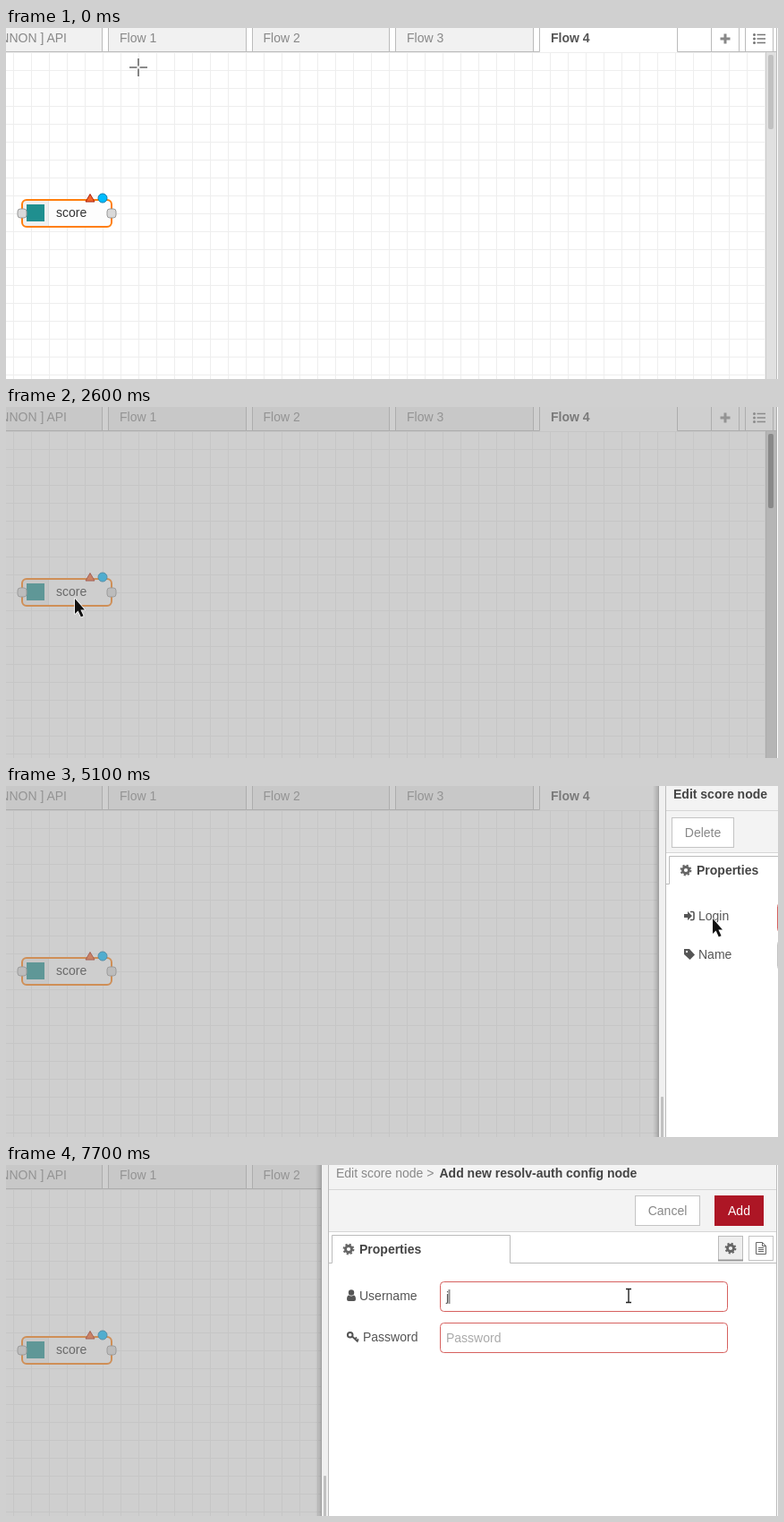
An HTML page for the animation above (8 s loop, 863 by 392 pixels).

```html
<!DOCTYPE html>
<html lang="en">
<head>
<meta charset="utf-8">
<title>Node editor</title>
<style>
html, body { margin: 0; width: 100%; height: 100%; overflow: hidden; background: #fff; }
svg { display: block; width: 100vw; height: 100vh; }
text { font: 14px "Liberation Sans", Arial, sans-serif; fill: #555; white-space: pre; }
.b { font-weight: bold; fill: #444; }
.mid { text-anchor: middle; }
.mute { fill: #888; }
.hint { fill: #aaa; }
.white { fill: #fff; }
.tab { fill: #f1f1f1; stroke: #bbb; }
.box { fill: #fff; stroke: #c4c4c4; }
.bad { fill: #fff; stroke: #d6615f; }
.on { fill: #eee; stroke: #bbb; }
.red { fill: #ad1625; }
.line { fill: none; stroke: #bbb; }
.ico { fill: #555; }
.wire { fill: none; stroke: #666; }
.cursor path { paint-order: stroke; stroke: #fff; stroke-width: 1.6; stroke-linejoin: round; }

/* 100 ms is 1.25% */
.anim { animation: 8s step-end -4ms infinite; }
#pointer { animation-name: travel; }
#cross { animation-name: cross; }
#move { animation-name: move; }
#arrow { animation-name: arrow; }
#hand { animation-name: hand; }
#beam { animation-name: beam; }
#shade { animation-name: shade; }
#tray1 { animation-name: tray1; }
#tray2 { animation-name: tray2; }
#drop { animation-name: drop; }
#penHover { animation-name: pen; }
#hint { animation-name: hint; }
#typed { animation-name: typed; }
#caret { animation-name: caret; }

@keyframes travel {
  0% { transform: translate(148px, 44px); }
  8.75% { transform: translate(148px, 44px); animation-timing-function: steps(3, start); }
  12.5% { transform: translate(128px, 88px); animation-timing-function: steps(3, start); }
  16.25% { transform: translate(90px, 178px); animation-timing-function: steps(3, start); }
  20% { transform: translate(76px, 216px); }
  22.5% { transform: translate(76px, 215px); }
  25% { transform: translate(77px, 214px); }
  41.25% { transform: translate(87px, 211px); }
  43.75% { transform: translate(87px, 211px); animation-timing-function: steps(3, start); }
  47.5% { transform: translate(300px, 221px); animation-timing-function: steps(3, start); }
  51.25% { transform: translate(620px, 194px); animation-timing-function: steps(3, start); }
  54.99% { transform: translate(738px, 159px); }
  55% { transform: translate(763px, 153px); }
  56.25% { transform: translate(776px, 150px); }
  57.5% { transform: translate(785px, 148px); }
  58.75% { transform: translate(790px, 148px); }
  72.5% { transform: translate(790px, 148px); animation-timing-function: steps(5, start); }
  78.75%, 100% { transform: translate(696px, 146px); }
}
@keyframes cross { 0% { opacity: 1; } 17.5%, 100% { opacity: 0; } }
@keyframes move { 0% { opacity: 0; } 17.5% { opacity: 1; } 30%, 100% { opacity: 0; } }
@keyframes arrow {
  0% { opacity: 0; } 30% { opacity: 1; } 55% { opacity: 0; }
  63.75% { opacity: 1; } 67.5%, 100% { opacity: 0; }
}
@keyframes hand { 0% { opacity: 0; } 55% { opacity: 1; } 63.75%, 100% { opacity: 0; } }
@keyframes beam { 0% { opacity: 0; } 67.5%, 100% { opacity: 1; } }
@keyframes shade { 0% { opacity: 0; } 30% { opacity: .5; } 32.5%, 100% { opacity: 1; } }
@keyframes tray1 {
  0% { transform: translateX(520px); }
  35% { transform: translateX(300px); }
  36.25% { transform: translateX(50px); }
  37.5% { transform: none; }
  62.5% { transform: translateX(110px); }
  63.75% { transform: translateX(377px); }
  65% { transform: translateX(500px); }
  66.25%, 100% { transform: translateX(520px); }
}
@keyframes tray2 {
  0% { transform: translateX(520px); }
  67.5% { transform: translateX(300px); }
  68.75% { transform: translateX(50px); }
  70%, 100% { transform: none; }
}
@keyframes drop { 0% { opacity: 0; } 55% { opacity: 1; } 56.25%, 100% { opacity: 0; } }
@keyframes pen { 0% { opacity: 0; } 56.25% { opacity: 1; } 65%, 100% { opacity: 0; } }
@keyframes hint { 0% { opacity: 1; } 95%, 100% { opacity: 0; } }
@keyframes typed { 0% { opacity: 0; } 95%, 100% { opacity: 1; } }
@keyframes caret {
  0% { opacity: 0; transform: none; }
  80% { opacity: 1; transform: none; }
  95% { opacity: 0; transform: none; }
  96.25%, 100% { opacity: 1; transform: translateX(2.5px); }
}
</style>
</head>
<body>
<svg viewBox="0 0 863 392" preserveAspectRatio="none">
  <defs>
    <pattern id="grid" x="8" y="27" width="20" height="20" patternUnits="userSpaceOnUse">
      <path d="M.5 0V20M0 .5H20" stroke="#eee"/>
    </pattern>
    <linearGradient id="edge">
      <stop offset="0" stop-opacity="0"/>
      <stop offset="1" stop-opacity=".16"/>
    </linearGradient>
    <g id="gear" fill="none" stroke="#666">
      <circle r="3.5" stroke-width="2.8"/>
      <circle r="5.2" stroke-width="2.4" stroke-dasharray="2.042"/>
    </g>
    <g id="file" class="wire">
      <path d="M-5.5-6.5H1.5L5.5-2.5V6.5H-5.5ZM1.5-6.5V-2.5H5.5M-3-.5H3M-3 1.5H3M-3 3.5H3"/>
    </g>
    <g id="port"><rect x="-5" y="-5" width="10" height="10" rx="3" fill="#d9d9d9" stroke="#999"/></g>
    <g id="frame">
      <rect x="346" width="6" height="392" fill="url(#edge)"/>
      <rect x="352" width="520" height="392" fill="#fff"/>
      <rect x="352" width="9" height="392" fill="#f0f0f0"/>
      <path d="M352.5 0V392" stroke="#a0a0a0"/>
      <rect x="355" y="347" width="3" height="50" rx="1" fill="#c1c1c1"/>
      <rect x="361" width="500" height="74" fill="#f3f3f3"/>
      <path class="line" d="M360.5 0V392M861.5 0V392"/>
      <path d="M361 27.5H861M361 74.5H861" stroke="#d6d6d6"/>
      <path class="line" d="M361 109.5H364.5V78.5H563.5V109.5H861"/>
      <use href="#gear" x="383" y="94"/>
      <text class="b" x="395" y="99">Properties</text>
    </g>
  </defs>

  <!-- workspace -->
  <rect width="863" height="392" fill="#fff"/>
  <rect y="27" width="849" height="365" fill="url(#grid)"/>
  <path class="tab" d="M-9.5-1H107.5V26.5H-9.5ZM114.5-1H268.5V26.5H114.5ZM275.5-1H428.5V26.5H275.5ZM435.5-1H589.5V26.5H435.5Z"/>
  <path class="line" d="M0 26.5H596.5V0M750.5 0V26.5H861M788.5 26V0M819.5 0V26M826.5 26V0M857.5 0V26"/>
  <text class="mute" x="68" y="16" text-anchor="end">NNON ] API</text>
  <text class="mute" x="127" y="16">Flow 1</text>
  <text class="mute" x="287.5" y="16">Flow 2</text>
  <text class="mute" x="448" y="16">Flow 3</text>
  <text class="b" x="609" y="16" style="fill:#555">Flow 4</text>
  <path d="M798.5 12H809.5M804 6.5V17.5" stroke="#888" stroke-width="3"/>
  <path d="M839.5 7.5H849M839.5 12H849M839.5 16.5H849" stroke="#777" stroke-width="1.6"/>
  <path d="M836.5 7.5h.01M836.5 12h.01M836.5 16.5h.01" stroke="#777" stroke-width="3" stroke-linecap="round"/>
  <rect x="849" y="27" width="12" height="365" fill="#e0e0e0"/>
  <path d="M849.5 27V392" stroke="#ccc"/>
  <rect x="852" y="30" width="6" height="83" rx="2" fill="#c1c1c1"/>
  <path class="line" d="M861.5 0V392"/>

  <!-- node -->
  <rect x="18" y="192" width="100" height="30" rx="5" fill="#fdfdfd"/>
  <path d="M48 192H23a5 5 0 0 0-5 5V217a5 5 0 0 0 5 5H48Z" fill="#f0f0f0"/>
  <path d="M47.5 193V221" stroke="#e4e4e4"/>
  <rect x="23" y="197" width="20" height="19" fill="#1f8f8f"/>
  <rect x="18" y="192" width="100" height="30" rx="5" fill="none" stroke="#ff7f0e" stroke-width="2"/>
  <text x="56" y="211" style="fill:#333">score</text>
  <use href="#port" x="18" y="207"/>
  <use href="#port" x="118" y="207"/>
  <path d="M89 194H99L94 185.5Z" fill="#f5652a" stroke="#a8200d" stroke-linejoin="round"/>
  <circle cx="108" cy="190" r="5" fill="#00bcff" stroke="#0a7fb0"/>

  <g id="shade" class="anim">
    <rect width="862" height="392" fill="#a0a0a0" fill-opacity=".5"/>
    <rect x="849" y="27" width="12" height="365" fill-opacity=".05"/>
    <rect x="852" y="30" width="6" height="83" rx="2" fill-opacity=".18"/>
  </g>

  <!-- edit tray -->
  <g id="tray1" class="anim">
    <use href="#frame"/>
    <text class="b" x="369" y="14">Edit score node</text>
    <rect class="box" x="367.5" y="35.5" width="69" height="33"/>
    <text class="mid mute" x="402" y="57">Delete</text>
    <rect class="box" x="694.5" y="34.5" width="73" height="33"/>
    <text class="mid mute" x="731" y="56">Cancel</text>
    <rect class="red" x="784" y="34" width="63" height="34"/>
    <text class="mid white" x="815.5" y="56">Done</text>
    <rect class="on" x="762.5" y="79.5" width="27" height="27"/>
    <path d="M762 106.5H790" stroke="#999" stroke-width="2"/>
    <use href="#gear" x="776" y="93"/>
    <rect class="box" x="796.5" y="79.5" width="27" height="27"/>
    <use href="#file" x="810" y="93"/>
    <rect class="box" x="830.5" y="79.5" width="27" height="27"/>
    <path class="wire" d="M838.5 87.5H849.5V98.5H838.5ZM840.5 89.5H845.5V94.5H840.5ZM845.5 91.5H847.5V96.5H842.5V94.5"/>
    <path d="M837 87.5h3M848 87.5h3M837 98.5h3M848 98.5h3" stroke="#666" stroke-width="3"/>

    <path class="ico" d="M381 143H385V140L390 145 385 150V147H381Z"/>
    <path d="M388 140.5H390.5Q392 140.5 392 142V148Q392 149.5 390.5 149.5H388" fill="none" stroke="#555" stroke-width="1.6"/>
    <text x="397" y="150">Login</text>
    <rect class="bad" x="485.5" y="130.5" width="281" height="33" rx="4"/>
    <g id="drop" class="anim">
      <rect x="754" y="131" width="12" height="32" fill="#ddd"/>
      <path d="M765.5 133V161" stroke="#888" stroke-width="2"/>
    </g>
    <path d="M756.5 145.5H763.5L760 149.5Z" fill="#222"/>
    <text x="496" y="152">Add new resolv-auth...</text>
    <rect class="box" x="774.5" y="130.5" width="32" height="33" rx="2"/>
    <rect id="penHover" class="on anim" x="774.5" y="130.5" width="32" height="33" rx="2"/>
    <path d="M785 153V149.5L791.5 143 795 146.5 788.5 153ZM792.3 142.2L793.5 141 797 144.5 795.8 145.7Z" fill="#777"/>

    <path class="ico" fill-rule="evenodd" d="M381 182H387L393 188.5 387.5 194 381 188ZM384 183.8a1.2 1.2 0 1 0 .01 0Z"/>
    <text x="397" y="193">Name</text>
    <rect class="box" x="485.5" y="172.5" width="321" height="33" rx="4"/>
    <text class="hint" x="492" y="194">Name</text>
  </g>

  <!-- config tray -->
  <g id="tray2" class="anim">
    <use href="#frame"/>
    <text class="mute" x="369" y="14">Edit score node &gt;</text>
    <text class="b" x="484.5" y="14">Add new resolv-auth config node</text>
    <rect class="box" x="703.5" y="34.5" width="72" height="33"/>
    <text class="mid mute" x="739.5" y="56">Cancel</text>
    <rect class="red" x="792" y="34" width="55" height="34"/>
    <text class="mid white" x="819.5" y="56">Add</text>
    <rect class="on" x="796.5" y="79.5" width="27" height="27"/>
    <path d="M796 106.5H824" stroke="#999" stroke-width="2"/>
    <use href="#gear" x="810" y="93"/>
    <rect class="box" x="830.5" y="79.5" width="27" height="27"/>
    <use href="#file" x="844" y="93"/>

    <circle class="ico" cx="386" cy="142.5" r="3.2"/>
    <path class="ico" d="M381 150Q381 145.5 383.5 145.5Q386 147.5 388.5 145.5Q391 145.5 391 150Q391 152 389 152H383Q381 152 381 150Z"/>
    <text x="395" y="151">Username</text>
    <rect class="bad" x="485.5" y="130.5" width="321" height="33" rx="4"/>
    <text id="hint" class="hint anim" x="492" y="152">username</text>
    <text id="typed" class="anim" x="492" y="152">j</text>
    <path id="caret" class="anim" d="M493 139V155" stroke="#222"/>

    <circle cx="384.7" cy="189.7" r="2.8" fill="none" stroke="#555" stroke-width="2"/>
    <path d="M387 191.5L393.5 197.5M390 194.5L392 192.5M392 196.5L394 194.5" stroke="#555" stroke-width="1.8"/>
    <text x="399" y="197">Password</text>
    <rect class="bad" x="485.5" y="176.5" width="321" height="33" rx="4"/>
    <text class="hint" x="492" y="198">Password</text>
  </g>

  <g id="pointer" class="anim cursor">
    <g id="cross" class="anim" fill="none">
      <path d="M-10 0H10M0-10V10" style="stroke-width:3"/>
      <path d="M-10 0H-1.5M1.5 0H10M0-10V-1.5M0 1.5V10" style="stroke:#666;stroke-width:1.6"/>
    </g>
    <g id="move" class="anim">
      <path d="M0-12.5L3.5-7H1V-4H-1V-7H-3.5ZM0 12.5L3.5 7H1V4H-1V7H-3.5ZM-12.5 0L-7-3.5V-1H-4V1H-7V3.5ZM12.5 0L7-3.5V-1H4V1H7V3.5Z"/>
      <circle r="3.8" fill="#fff"/>
      <circle r="2.3" fill="#ff7f0e"/>
    </g>
    <path id="arrow" class="anim" d="M0 0V17L3.6 13.6 6.8 20.5 9.6 19.3 6.4 12.5H11Z" fill="#111"/>
    <path id="hand" class="anim" d="M-1.5 1Q0-1.5 1.5 1V7L9.5 8.3Q12.5 9 12.5 12V15L10.5 18V20H1V18L-5.5 11Q-6-8 -5.5 10Q-5 8.5 -3 9.3L-1.5 10.5Z" fill="#111"/>
    <g id="beam" class="anim">
      <path d="M-3-7.5H3M0-7.5V7.5M-3 7.5H3" fill="none" style="stroke:#222;stroke-width:1.4"/>
    </g>
  </g>
</svg>
</body>
</html>
```
